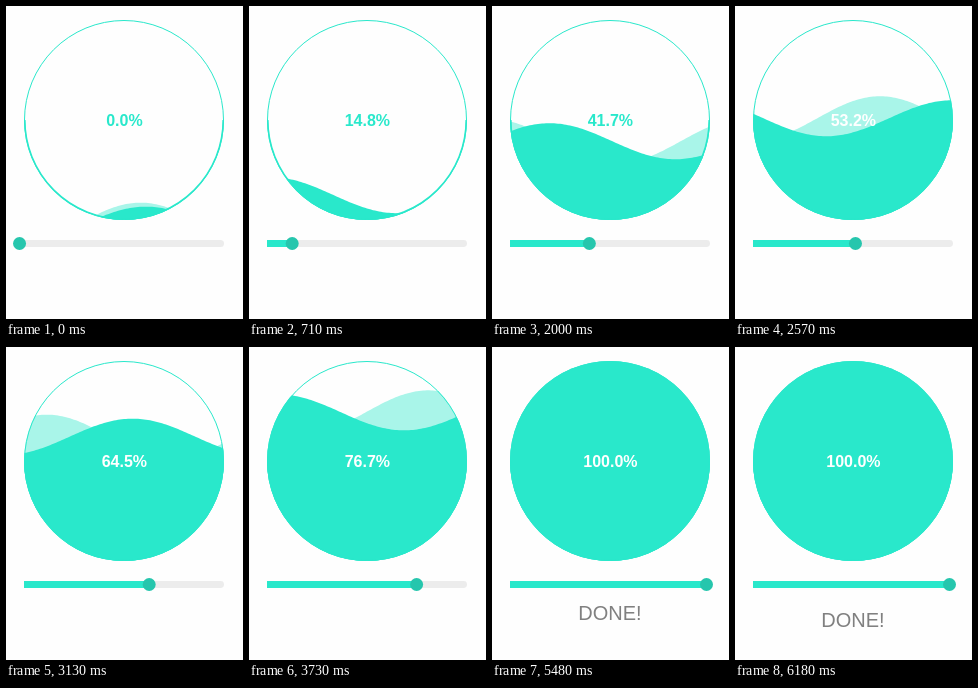
Write an HTML page that moves like this. It is 237 by 313 pixels and loops after 7.25 s.

```html
<!DOCTYPE html>
<html lang="en">
<head>
<meta charset="utf-8">
<title>Water progress</title>
<style>
  html, body { margin: 0; width: 100%; height: 100%; overflow: hidden; background: #fefefe; }
  svg { display: block; width: 237px; height: 313px; }
  text { font-family: "Liberation Sans", Arial, sans-serif; text-anchor: middle; }
  #label { font-size: 16px; font-weight: bold; }
  #done { font-size: 20px; fill: #808080; }
</style>
</head>
<body>
<svg viewBox="0 0 237 313">
  <clipPath id="ball"><circle cx="118" cy="114" r="100"/></clipPath>
  <g clip-path="url(#ball)">
    <path id="back" fill="#a9f5e9"/>
    <path id="front" fill="#29e8cb"/>
  </g>
  <g fill="none" stroke="#29e8cb">
    <circle cx="118" cy="114" r="99.5"/>
    <path d="M18.8 114a99.2 99.2 0 0 0 198.4 0" stroke-width="1.6"/>
  </g>
  <text id="label" x="118.4" y="120"></text>
  <path d="M18 234H214.5a3.5 3.5 0 0 1 0 7H18z" fill="#ececec"/>
  <rect id="bar" x="18" y="234" height="7" fill="#29e8cb"/>
  <circle id="thumb" cy="237.5" r="6.5" fill="#26c6ad"/>
  <text id="done" x="118" y="280">DONE!</text>
</svg>
<script>
const LOOP = 7250, WAVE_END = 4990, DONE_AT = 5286, BOUNCE = 900;
const $ = id => document.getElementById(id);
const label = $('label'), bar = $('bar'), thumb = $('thumb'), done = $('done');

// Cubic-bezier easing, solved for x by bisection
const bezier = (x1, y1, x2, y2) => x => {
  const at = (a, b, s) => 3 * a * s * (1 - s) ** 2 + 3 * b * s * s * (1 - s) + s ** 3;
  let lo = 0, hi = 1;
  for (let i = 0; i < 24; i++) {
    const mid = (lo + hi) / 2;
    if (at(x1, x2, mid) < x) lo = mid; else hi = mid;
  }
  return at(y1, y2, lo);
};
const linear = x => x;
const ease = bezier(.25, .1, .25, 1);
const up = bezier(.215, .61, .355, 1);
const down = bezier(.755, .05, .855, .06);

// Keys are [time, value, easing towards the next key]
function track(keys, t) {
  if (t <= keys[0][0]) return keys[0][1];
  for (let i = 1; i < keys.length; i++) {
    const [t0, v0, f = linear] = keys[i - 1], [t1, v1] = keys[i];
    if (t < t1) return v0 + (v1 - v0) * f((t - t0) / (t1 - t0));
  }
  return keys[keys.length - 1][1];
}

const progress = [[0, 0], [1300, 27], [2000, 41.7], [3130, 64.5], [4300, 88.2], [WAVE_END, 102.2]];
const bounce = [[0, 0, up], [.2, 0, up], [.4, -30, down], [.43, -30, down], [.53, 0, up],
                [.7, -15, down], [.8, 0, up], [.9, -4, ease], [1, 0]];

function wave(id, crest, height, level) {
  let d = 'M18 220';
  for (let x = 18; x <= 218; x += 2)
    d += `L${x} ${(level - height * Math.cos((x - crest) * .025)).toFixed(2)}`;
  $(id).setAttribute('d', d + 'L218 220Z');
}

function draw(t) {
  const p = track(progress, t), shown = Math.min(p, 100), finished = t >= DONE_AT;
  // The water trails the number slightly and fills up on completion
  const level = finished ? -20 : 218.7 - 2 * p;
  wave('back', 134.7 - 9.25 * p, 22, level);
  wave('front', 140 - 8 * p, 18, level);

  label.textContent = shown.toFixed(1) + '%';
  label.setAttribute('fill', shown > 50 ? '#fff' : '#29e8cb');

  const x = 13.5 + 2.01 * shown;
  thumb.setAttribute('cx', x);
  bar.setAttribute('width', Math.max(0, x - 18));

  done.setAttribute('visibility', finished ? 'visible' : 'hidden');
  done.setAttribute('y', 280 + track(bounce, (t - DONE_AT) / BOUNCE));
}

const start = performance.now();
function tick() {
  draw((performance.now() - start) % LOOP);
  requestAnimationFrame(tick);
}
tick();
</script>
</body>
</html>
```
